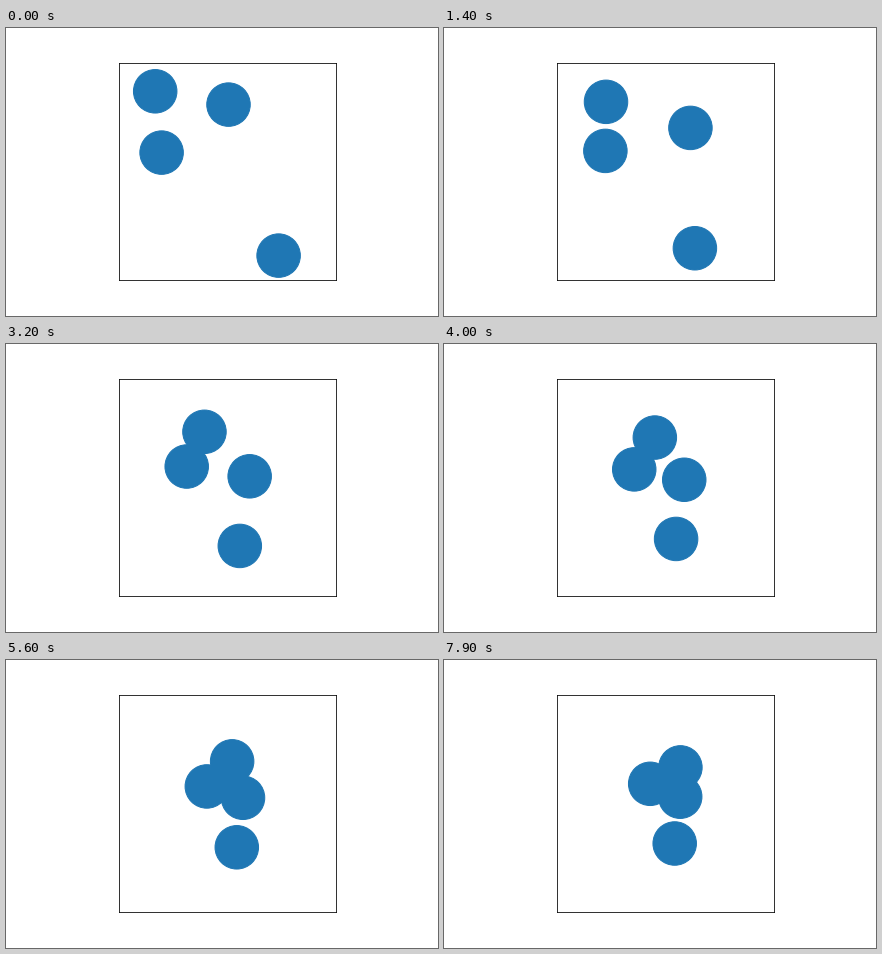
Animation of 432 by 288 pixels, one loop 8000 ms. Source, as a matplotlib script:

```python
import numpy as np
import matplotlib.pyplot as plt
from matplotlib.animation import FuncAnimation
from matplotlib.patches import Circle

W, H, DPI = 432, 288, 72
FRAMES, INTERVAL = 80, 100
LEFT, TOP, SIDE = 112.68, 34.56, 217.44
RADIUS = 0.1 * SIDE
DECAY = 40  # frames for the motion to slow by a factor of e

# Way of each disc in stage pixels, passed in equal steps of slowed time.
WAYS = np.array([
    [(149.2, 63.3), (153.4, 68.6), (167.1, 76.2),
     (193.3, 85.6), (218.6, 97.4), (236.4, 107.4)],
    [(222.5, 76.6), (238.6, 87), (248, 105.9),
     (244.8, 129.7), (238.3, 137), (236.2, 136.7)],
    [(155.6, 124.6), (158.2, 124.3), (163.6, 122.4),
     (177.2, 121.8), (196, 126.6), (206.2, 123.8)],
    [(272.6, 227.6), (260.6, 225), (247.1, 217.6),
     (235.1, 204.7), (231.4, 190.8), (230.7, 183.5)],
])
SLOPES = np.gradient(WAYS, axis=1, edge_order=2)
STEPS = WAYS.shape[1] - 1


def slowed(n):
    """Time from 0 to 1 that runs ever slower."""
    return np.expm1(-n / DECAY) / np.expm1(-(FRAMES - 1) / DECAY)


def positions(n):
    """Disc centres, by cubic Hermite curves along the ways."""
    s = STEPS * slowed(n)
    i = min(int(s), STEPS - 1)
    u = s - i
    blend = u * u * (3 - 2 * u)
    return ((1 - blend) * WAYS[:, i] + blend * WAYS[:, i + 1]
            + u * (1 - u) * ((1 - u) * SLOPES[:, i] - u * SLOPES[:, i + 1]))


fig = plt.figure(figsize=(W / DPI, H / DPI), dpi=DPI, facecolor="white")
ax = fig.add_axes([LEFT / W, 1 - (TOP + SIDE) / H, SIDE / W, SIDE / H])
ax.set(xlim=(LEFT, LEFT + SIDE), ylim=(TOP + SIDE, TOP), xticks=[], yticks=[])

discs = [ax.add_patch(Circle(c, RADIUS, color="C0", lw=1)) for c in positions(0)]


def update(n):
    for disc, centre in zip(discs, positions(n)):
        disc.center = centre
    return discs


anim = FuncAnimation(fig, update, frames=FRAMES, interval=INTERVAL,
                     repeat=True, repeat_delay=0)
plt.show()
```
